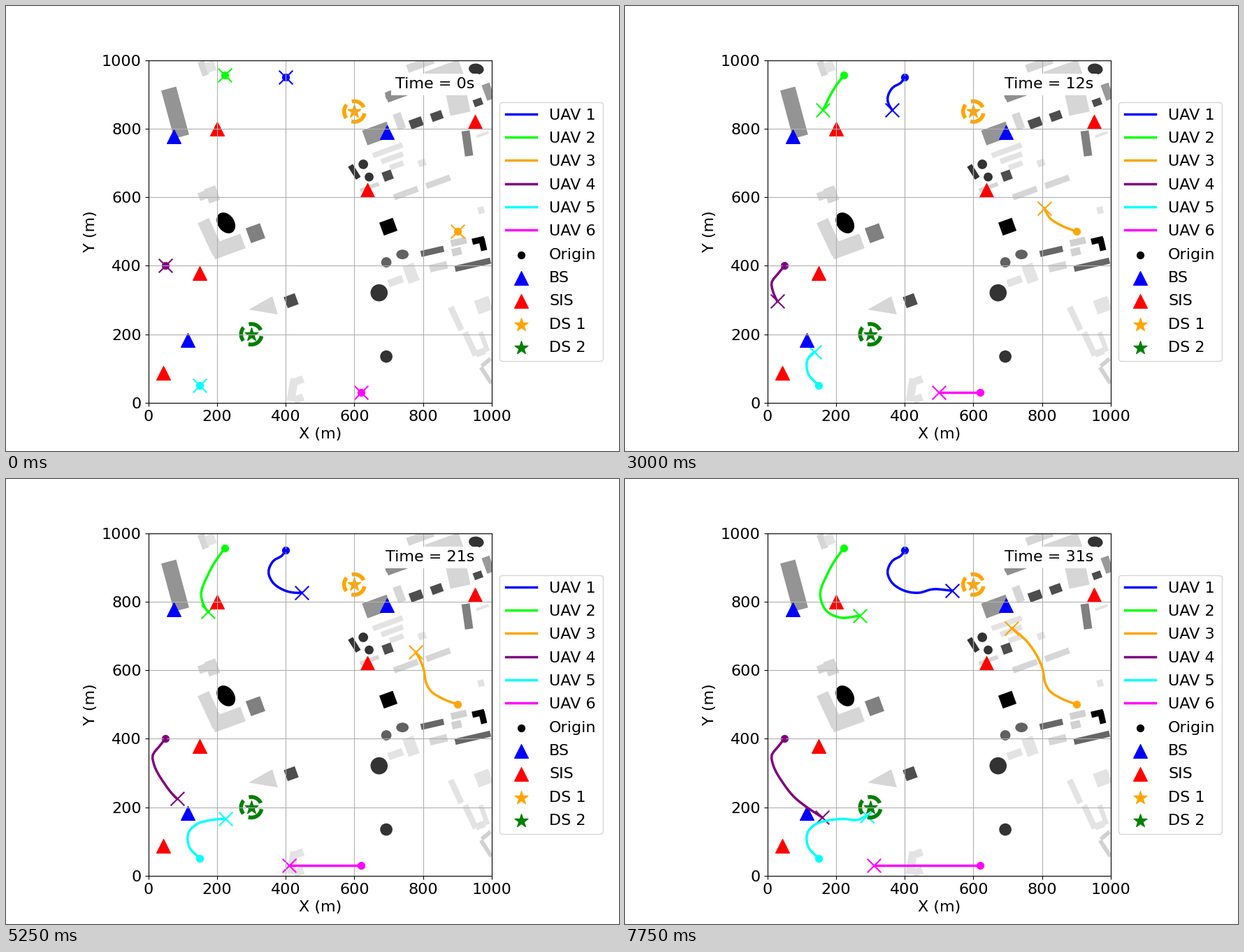
Write a matplotlib script that moves like this. It is 877x638 px and loops after 8000 ms.

```python
import numpy as np
import matplotlib.pyplot as plt
from matplotlib.animation import FuncAnimation
from matplotlib.patches import Circle, Ellipse, Rectangle

WIDTH, HEIGHT, DPI = 877, 638, 100
SECONDS, SPEED = 32, 10
STREET_TILT = 20
BLACK, DARK, SLATE, GREY, LIGHT, PALE = "0", "0.2", "0.3", "0.5", "0.84", "0.89"

plt.rcParams.update({"font.family": "DejaVu Sans", "font.size": 16})
fig = plt.figure(figsize=(WIDTH / DPI, HEIGHT / DPI), dpi=DPI)
side = 0.77 * HEIGHT
ax = fig.add_axes([203.65 / WIDTH, 69.1 / HEIGHT, side / WIDTH, side / HEIGHT])
ticks = range(0, 1001, 200)
ax.set(xlim=(0, 1000), ylim=(0, 1000), xticks=ticks, yticks=ticks,
       xlabel="X (m)", ylabel="Y (m)")
ax.grid(True)


def block(shade, x, y, w, h, tilt=STREET_TILT):
    ax.add_patch(Rectangle((x - w / 2, y - h / 2), w, h, angle=tilt,
                           rotation_point="center", fc=shade, ec="none", zorder=0))


def tower(shade, x, y, rx, ry=None, tilt=0):
    ax.add_patch(Ellipse((x, y), 2 * rx, 2 * (ry or rx), angle=tilt,
                         fc=shade, ec="none", zorder=0))


def draw_west():
    block("0.58", 78, 847, 45, 145, 15)
    block(LIGHT, 160, 976, 20, 44)
    block(PALE, 181, 981, 28, 30)
    block(LIGHT, 186, 608, 34, 44)
    block(LIGHT, 160, 605, 28, 24)
    block(LIGHT, 182, 484, 36, 105, 25)
    block(LIGHT, 231, 456, 95, 45)
    tower(BLACK, 226, 525, 24, 33, 35)
    block(GREY, 312, 495, 44, 46)
    block(SLATE, 416, 298, 34, 34)
    ax.fill([292, 361, 377], [272, 311, 258], fc=LIGHT, ec="none", zorder=0)
    block(PALE, 420, 38, 24, 66, -10)
    for y in (12, 65):
        block(PALE, 438, y, 28, 22)


def draw_north_east():
    block(LIGHT, 792, 988, 80, 24)
    block(LIGHT, 862, 960, 105, 50)
    block(LIGHT, 897, 900, 60, 115, 12)
    block("0.56", 747, 910, 114, 30)
    tower("0.56", 705, 896, 15)
    tower(DARK, 955, 974, 22, 16, -8)
    block("0.6", 990, 908, 24, 48)
    for k in (0, 1, 3):  # houses along one street, with a gap
        block(SLATE, 780 + 60 * k, 817 + 20 * k, 38 - 4 * k, 27 - 2 * k)
    block(LIGHT, 731, 822, 24, 48)
    block("0.58", 666, 786, 76, 46)
    block(GREY, 929, 757, 24, 74, 8)
    block(PALE, 973, 783, 38, 8)
    for k in range(3):  # sheds getting shorter
        block(PALE, 697 + 13 * k, 737 - 22 * k, 92 - 25 * k, 16)
    block(PALE, 797, 700, 22, 20)
    block(DARK, 600, 674, 16, 44, 32)
    tower(DARK, 626, 696, 14)
    tower(DARK, 643, 659, 13)
    block(SLATE, 697, 663, 28, 28)
    for k in range(2):
        block(LIGHT, 750 + 94 * k, 612 + 33 * k, 74, 18)
    block(LIGHT, 644, 629, 58, 12)


def draw_south_east():
    tilt = 13
    block(BLACK, 699, 514, 42, 40)
    block(PALE, 969, 562, 18, 20, tilt)
    block("0.4", 827, 442, 68, 18, tilt)
    block("0.4", 945, 403, 106, 18, tilt)
    block("0.82", 904, 470, 46, 20, tilt)
    block("0.82", 898, 441, 28, 22, tilt)
    block(LIGHT, 845, 397, 52, 22, tilt)
    block(BLACK, 961, 474, 36, 18, tilt)
    block(BLACK, 974, 462, 18, 36, tilt)
    tower("0.38", 693, 410, 15)
    tower("0.38", 740, 433, 18, 14)
    block(PALE, 765, 378, 34, 54)
    block(PALE, 720, 355, 44, 22)
    tower(DARK, 672, 321, 25)
    tower(DARK, 693, 135, 18)
    for k in range(2):
        block(PALE, 896 + 42 * k, 246 - 74 * k, 18, 74, 25)
    block(PALE, 976, 285, 44, 42)
    block(PALE, 967, 147, 28, 20)
    block(PALE, 978, 178, 14, 60)
    block("0.82", 984, 118, 34, 12, 40)
    block("0.82", 984, 80, 12, 56, 33)


def flight(*waypoints):
    """Smooth route through the waypoints, flown at constant speed to its end."""
    pts = np.array(waypoints, float)
    knots = np.r_[0, np.cumsum(np.hypot(*np.diff(pts, axis=0).T))]
    s = np.linspace(0, knots[-1], 600)
    i = np.clip(np.searchsorted(knots, s, side="right") - 1, 0, len(pts) - 2)
    h = (knots[i + 1] - knots[i])[:, None]
    u = (s - knots[i])[:, None] / h
    m = np.gradient(pts, knots, axis=0)
    ease = u * u * (3 - 2 * u)
    curve = (pts[i] * (1 - ease) + pts[i + 1] * ease
             + h * u * (1 - u) * (m[i] * (1 - u) - m[i + 1] * u))
    length = np.r_[0, np.cumsum(np.hypot(*np.diff(curve, axis=0).T))]
    flown = SPEED * np.arange(SECONDS)
    return np.column_stack([np.interp(flown, length, c) for c in curve.T])


draw_west()
draw_north_east()
draw_south_east()

paths = {
    "blue": flight((400, 950), (390, 935), (365, 920), (350, 885), (361, 858),
                   (394, 834), (442, 826), (479, 836), (538, 832)),
    "lime": flight((223, 957), (194, 916), (175, 881), (154, 816), (174, 771),
                   (210, 754), (270, 759)),
    "orange": flight((900, 500), (855, 518), (821, 541), (811, 558), (801, 606),
                     (780, 651), (756, 684), (712, 723)),
    "purple": flight((50, 400), (33, 379), (12, 348), (15, 330), (47, 269),
                     (78, 230), (111, 203), (159, 171)),
    "cyan": flight((150, 50), (118, 87), (117, 126), (145, 153), (174, 161),
                   (223, 166), (261, 163), (290, 175)),
    "magenta": flight((620, 30), (310, 30)),
}

trails, crosses = [], []
for n, (color, path) in enumerate(paths.items(), 1):
    trails += ax.plot([], [], color=color, lw=2.5, label=f"UAV {n}")
    crosses.append(ax.scatter(*path[0], marker="x", s=200, color=color))
    ax.scatter(*path[0], s=50, color=color)


def stations(color, label, marker, *places):
    return ax.scatter(*zip(*places), marker=marker, s=200, color=color, label=label)


keys = [
    ax.scatter([], [], s=50, color="black", label="Origin"),
    stations("blue", "BS", "^", (75, 777), (115, 183), (695, 790)),
    stations("red", "SIS", "^", (200, 799), (951, 821), (638, 621),
             (150, 378), (44, 87)),
]
for n, (color, spot) in enumerate({"orange": (600, 850), "green": (300, 200)}.items(), 1):
    keys.append(stations(color, f"DS {n}", "*", spot))
    ax.add_patch(Circle(spot, 30, fill=False, ec=color, ls="--", lw=4))

clock = ax.text(0.95, 0.95, "", transform=ax.transAxes, ha="right", va="top",
                bbox=dict(facecolor="white", edgecolor="none"))
ax.legend(handles=trails + keys, loc="center left", bbox_to_anchor=(1, 0.5),
          labelspacing=0.6)


def update(second):
    for path, trail, cross in zip(paths.values(), trails, crosses):
        trail.set_data(*path[:second + 1].T)
        cross.set_offsets(path[second])
    clock.set_text(f"Time = {second}s")
    return trails + crosses + [clock]


anim = FuncAnimation(fig, update, frames=SECONDS, interval=250, repeat=True,
                     repeat_delay=0, init_func=lambda: update(0))
plt.show()
```
